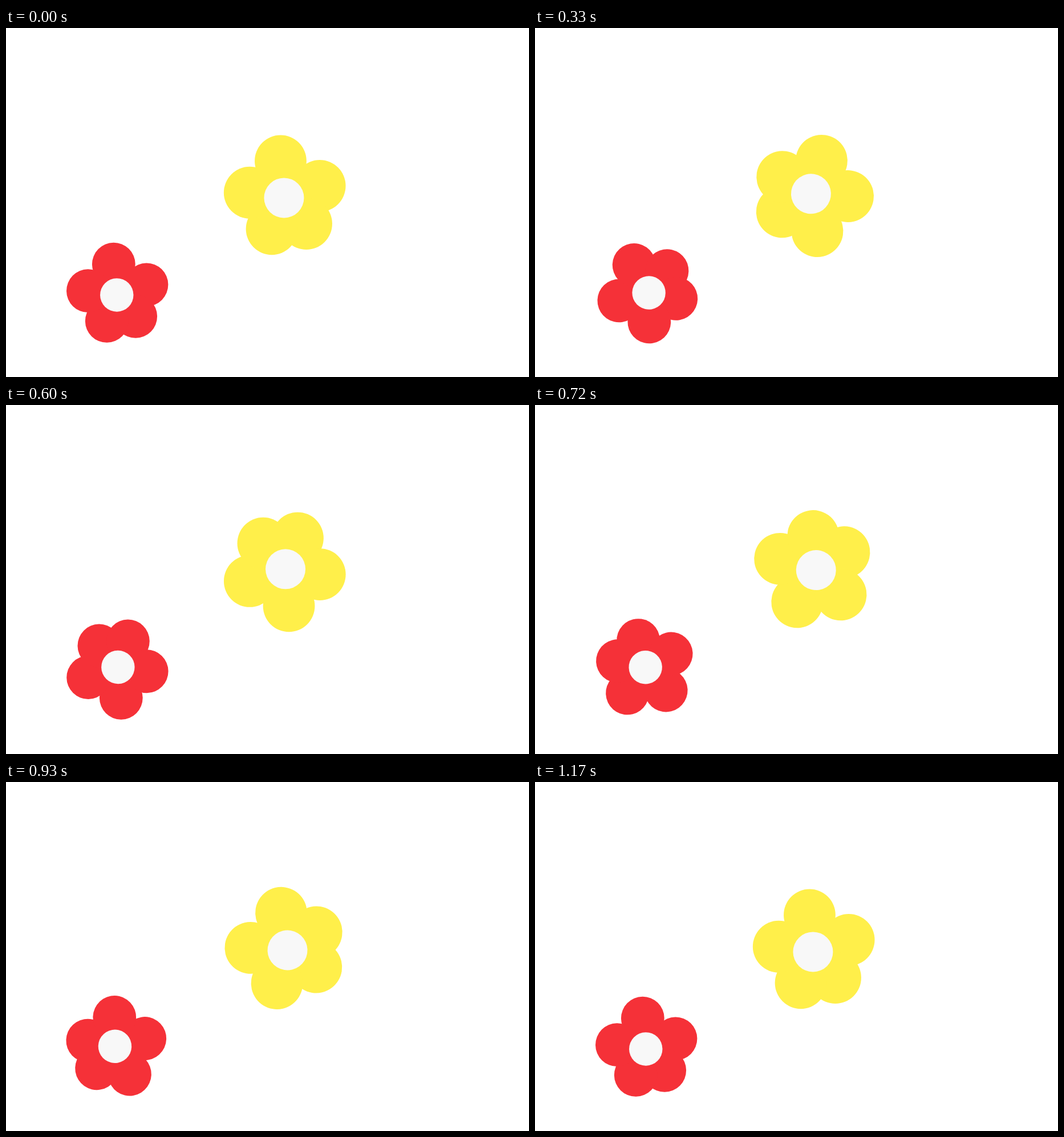
An HTML page with a canvas that plays this animation: 917x611 px, repeating every 1200 ms.

```html
<!DOCTYPE html>
<html lang="en">
<head>
<meta charset="utf-8">
<title>Spinning flowers</title>
<style>
html, body { margin: 0; width: 100%; height: 100%; overflow: hidden; background: #fff; }
canvas { display: block; }
</style>
</head>
<body>
<canvas id="stage" width="917" height="611"></canvas>
<script>
const stage = document.getElementById('stage');
const ctx = stage.getContext('2d');
const STEP_MS = 30;
const STEPS = 40;
const STEP_ANGLE = Math.PI * 2 / STEPS;

// One hand-drawn flower, relative to the pivot it spins about.
const shape = {
  petals: [[-7.3, -59.45], [61.4, -16.05], [37.8, 50.25], [-22.7, 59.35], [-61.5, -4.15]],
  petalRadius: 45.4,
  core: [-1.3, 5.05],
  coreRadius: 35
};

const flowers = [
  { x: 488.75, y: 292.4, scale: 1, spin: 1, tilt: 0, color: '#ffef4a' },
  { x: 195.3, y: 463.2, scale: 0.835, spin: -1, tilt: -0.008, color: '#f53138' }
];

function disc([x, y], radius, color) {
  ctx.fillStyle = color;
  ctx.beginPath();
  ctx.arc(x, y, radius, 0, Math.PI * 2);
  ctx.fill();
}

function drawFlower({ x, y, scale, spin, tilt, color }, angle) {
  ctx.save();
  ctx.translate(x, y);
  ctx.rotate(tilt + angle * spin);
  ctx.scale(scale, scale);
  for (const petal of shape.petals) disc(petal, shape.petalRadius, color);
  disc(shape.core, shape.coreRadius, '#f8f8f8');
  ctx.restore();
}

function render(time) {
  // The last step already shows the starting pose.
  const step = Math.floor(time / STEP_MS) % STEPS % (STEPS - 1);
  ctx.clearRect(0, 0, stage.width, stage.height);
  for (const flower of flowers) drawFlower(flower, step * STEP_ANGLE);
}

const start = performance.now();
function tick() {
  render(performance.now() - start);
  requestAnimationFrame(tick);
}
tick();
</script>
</body>
</html>
```
